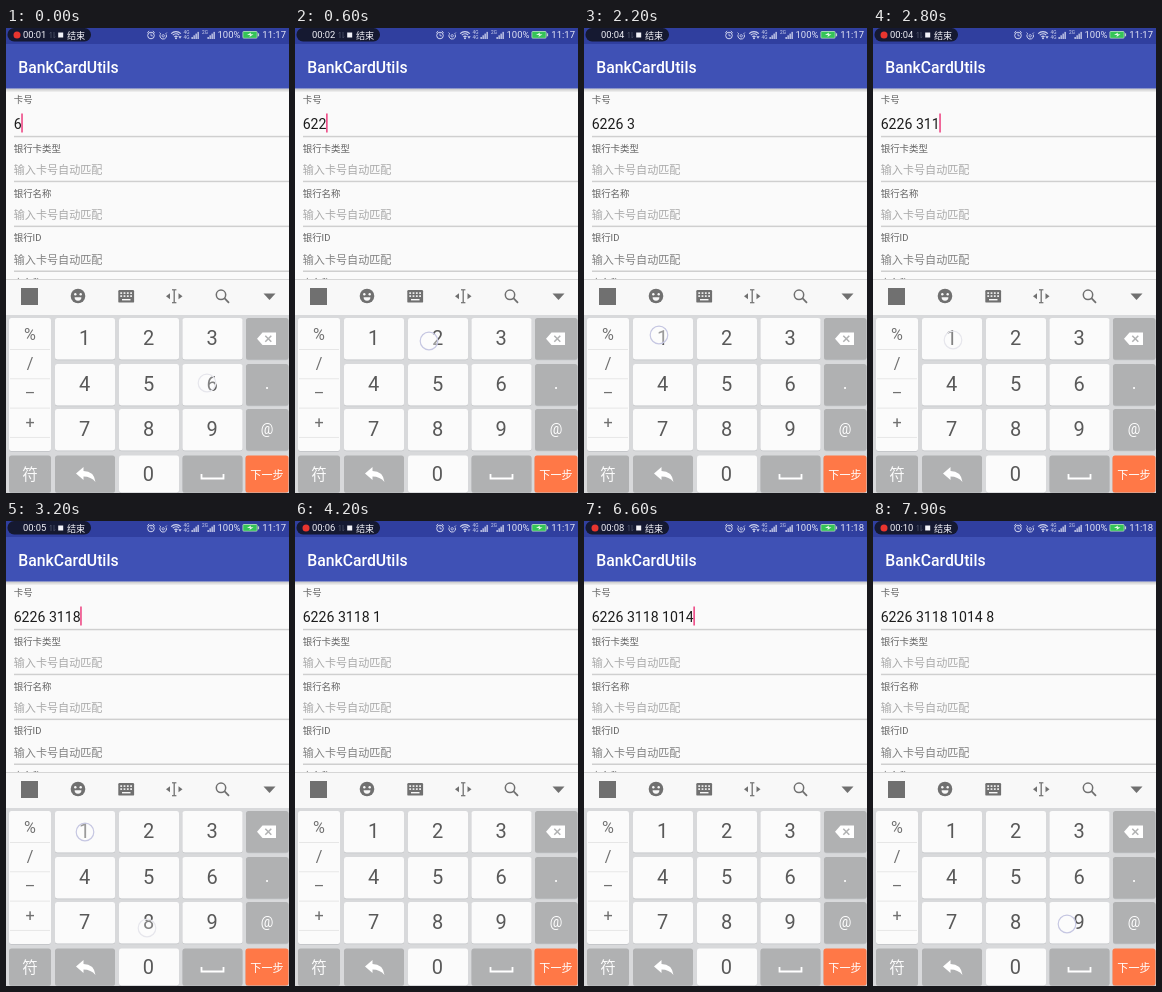
Animation of 283 by 465 pixels, one loop 8000 ms. Source, as an HTML page with a canvas:

```html
<!DOCTYPE html>
<html lang="zh-CN">
<head>
<meta charset="utf-8">
<title>BankCardUtils</title>
<style>
html, body { margin: 0; width: 100%; height: 100%; overflow: hidden; background: #fafafa; }
canvas { display: block; width: 283px; height: 465px; }
</style>
</head>
<body>
<canvas id="stage"></canvas>
<script>
const W = 283, H = 465, LOOP = 8000;
const canvas = document.getElementById('stage');
const ctx = canvas.getContext('2d');
const ratio = window.devicePixelRatio || 1;
canvas.width = W * ratio;
canvas.height = H * ratio;
const FONT = 'Roboto, "Noto Sans CJK SC", "Noto Sans CJK", sans-serif';

// Each tap: start time, position, character entered shortly after.
const taps = [
  [-200, 201, 355, '6'], [200, 138, 311, '2'], [500, 134, 313, '2'],
  [800, 204, 361, '6'], [1000, 204, 313, '3'], [2200, 75, 307, '1'],
  [2600, 80, 312, '1'], [3000, 141, 407, '8'], [3200, 79, 311, '1'],
  [5500, 141, 447, '0'], [5800, 79, 311, '1'], [6200, 78, 357, '4'],
  [6800, 137, 407, '8'], [7900, 194, 403, '9']
];
const TYPE_DELAY = 100, RING_SOLID = 200, RING_END = 300;
const caretOff = [[1500, 1900], [2200, 2300], [3500, 3800], [4200, 4600],
  [5200, 5600], [6700, 6900], [7500, 8000]];
const seconds = [300, 1100, 2000, 3000, 3800, 4700, 5700, 6700, 7500];
const dotBack = [700, 1600, 2500, 3400, 4200, 5200, 6200, 7100, 7900];

function rect(x, y, w, h, color) {
  ctx.fillStyle = color;
  ctx.fillRect(x, y, w, h);
}

function round(x, y, w, h, r, color) {
  ctx.fillStyle = color;
  ctx.beginPath();
  ctx.roundRect(x, y, w, h, r);
  ctx.fill();
}

function disc(x, y, r, color) {
  ctx.fillStyle = color;
  ctx.beginPath();
  ctx.arc(x, y, r, 0, Math.PI * 2);
  ctx.fill();
}

function arc(x, y, r, color, width = 1, from = 0, to = Math.PI * 2) {
  ctx.strokeStyle = color;
  ctx.lineWidth = width;
  ctx.beginPath();
  ctx.arc(x, y, r, from, to);
  ctx.stroke();
}

function trace(points) {
  ctx.beginPath();
  for (let i = 0; i < points.length; i += 2) ctx.lineTo(points[i], points[i + 1]);
}

function poly(points, color) {
  trace(points);
  ctx.fillStyle = color;
  ctx.fill();
}

function line(points, color, width = 1) {
  trace(points);
  ctx.strokeStyle = color;
  ctx.lineWidth = width;
  ctx.stroke();
}

function text(str, x, y, size, color, align = 'left', weight = 400) {
  ctx.font = `${weight} ${size}px ${FONT}`;
  ctx.fillStyle = color;
  ctx.textAlign = align;
  ctx.fillText(str, x, y);
}

function fade(y, h, from, to) {
  const g = ctx.createLinearGradient(0, y, 0, y + h);
  g.addColorStop(0, from);
  g.addColorStop(1, to);
  rect(0, y, W, h, g);
}

function recorder(t) {
  const n = seconds.filter(s => s <= t).length;
  const dotOn = n === 0 || t >= dotBack[n - 1];
  round(1.5, 0, 83.5, 13.5, 6.5, '#151931');
  if (dotOn) disc(11, 7, 3.5, '#e8352f');
  text('00:' + String(n + 1).padStart(2, '0'), 17, 10.4, 9.4, '#f4f4fa');
  line([45, 10, 45, 4, 43.8, 5.5], '#4c5169', .8);
  line([48, 4, 48, 10, 49.2, 8.5], '#4c5169', .8);
  rect(52.2, 4.5, 5, 5, '#f2f2f8');
  text('结束', 61, 10.5, 9.1, '#f4f4fa');
}

function statusIcons(t) {
  const c = '#d0d4ee';
  arc(145, 7.5, 3.3, c);
  line([145, 5.5, 145, 7.8, 146.8, 7.8], c, .8);
  line([141.3, 4.8, 143.2, 3], c);
  line([146.8, 3, 148.7, 4.8], c);
  arc(157.2, 7.8, 3.3, c, 1, -.4, 3.6);
  arc(157.2, 7.8, 1.2, c, .8);
  line([153.5, 4.5, 155, 6], c, .8);
  line([160.9, 4.5, 159.4, 6], c, .8);
  for (const r of [2.3, 4.6, 6.9]) arc(170, 10.5, r, c, 1.1, -2.35, -.8);
  disc(170, 10.3, 1, c);
  poly([172.3, 8.3, 175.7, 8.3, 174, 10.8], t >= 4000 && t < 4600 ? '#8f98d0' : c);
  signal(177.5, 185.5, ['4G', '4G'], c);
  signal(196, 201.5, ['2G'], c);
  text('100%', 211.5, 10.3, 9.5, '#dfe2f4');
  round(236.5, 3, 15, 7.6, 1.5, '#b9dcc4');
  rect(237.3, 3.8, 13.4, 6, '#35c458');
  poly([241, 7, 245, 4.6, 244.6, 6.3, 247.5, 6.3, 243.5, 9, 244, 7], '#e6f6ea');
  rect(251.8, 5.3, 1.3, 3, '#b9dcc4');
  text(t < 4800 ? '11:17' : '11:18', 280, 10.4, 9.5, '#e6e8f7', 'right');
}

function signal(x, barX, labels, c) {
  labels.forEach((label, i) => text(label, x, 6 + i * 5, 4.8, c));
  for (let i = 0; i < 4; i++) rect(barX + i * 2, 9 - i * 1.7, 1.3, 2 + i * 1.7, c);
}

function form(t) {
  rect(0, 60, W, 192, '#fafafa');
  fade(60.5, 4, 'rgba(0,0,0,.22)', 'rgba(0,0,0,0)');
  const labels = ['卡号', '银行卡类型', '银行名称', '银行ID', '卡名称'];
  labels.forEach((label, i) => {
    const y = 75.3 + i * 44.75 + (i ? 3.8 : 0);
    text(label, 7.7, y, 9.45, '#626262');
    if (i > 0 && i < 4) text('输入卡号自动匹配', 7.7, y + 22.3, 11.1, i === 3 ? '#808080' : '#a9a9a9');
    rect(8, 107.8 + i * 44.9, 275, 1.5, '#cfcfcf');
  });

  let typed = '';
  for (const tap of taps) if (tap[0] + TYPE_DELAY <= t) typed += tap[3];
  typed = typed.replace(/(.{4})(?=.)/g, '$1 ');
  text(typed, 7.7, 101, 14.1, '#1c1c1c');
  const hidden = caretOff.some(([a, b]) => t >= a && t < b);
  if (!hidden) rect(7.3 + ctx.measureText(typed).width, 85.5, 1.6, 19, '#ee4a86');
}

function toolbar() {
  const c = '#707070', paper = '#f8f8f8';
  rect(0, 251.5, W, 35.5, paper);
  rect(0, 251, W, 1, '#d6d6d6');
  rect(15, 260, 17, 17, c);

  disc(72, 268, 7.3, c);
  disc(69.3, 266.2, 1.2, paper);
  disc(74.7, 266.2, 1.2, paper);
  ctx.fillStyle = paper;
  ctx.beginPath();
  ctx.arc(72, 269.3, 3.4, 0, Math.PI);
  ctx.fill();

  round(112.3, 262, 15.8, 12.6, 1.2, c);
  for (let row = 0; row < 2; row++)
    for (let i = 0; i < 4; i++) rect(114.3 + i * 3.3, 264.3 + row * 3, 1.8, 1.6, paper);
  rect(116, 271, 8.5, 1.4, paper);

  line([168.2, 262, 168.2, 274.5], c, 1.3);
  line([166, 261.8, 170.4, 261.8], c, 1.2);
  line([166, 274.7, 170.4, 274.7], c, 1.2);
  poly([160, 268.3, 164, 265.3, 164, 271.3], c);
  poly([176.5, 268.3, 172.5, 265.3, 172.5, 271.3], c);

  arc(215, 266.8, 4.7, c, 1.5);
  line([218.4, 270.2, 223, 274.8], c, 1.8);
  poly([257.5, 265.5, 269.5, 265.5, 263.5, 272], c);
}

function key(x, y, w, h, color) {
  round(x, y + .8, w, h, 2.5, '#c0c2c5');
  round(x, y, w, h, 2.5, color);
}

function keyboard() {
  const white = '#fbfbfb', grey = '#b0b1b2', ink = '#595959';
  const rows = [290, 336, 381, 427.5], cols = [49, 113, 176.5], lastH = 37;
  rect(0, 287, W, 178, '#d8d9db');

  key(3, 290, 42, 133, white);
  ['%', '/', '–', '+'].forEach((s, i) => {
    text(s, 24, 312 + i * 29.3, 16.2, '#707070', 'center');
    rect(4, 321 + i * 29.3, 40, 1, '#e6e6e6');
  });

  for (let i = 0; i < 9; i++) {
    const x = cols[i % 3], y = rows[Math.floor(i / 3)];
    key(x, y, 60, 41.5, white);
    text(String(i + 1), x + 29.7, y + 27.3, 20, ink, 'center');
  }
  key(113, rows[3], 60, lastH, white);
  text('0', 142.3, 452.8, 20, ink, 'center');

  for (const y of rows.slice(0, 3)) key(240, y, 42.5, 41.5, grey);
  poly([251, 310.8, 256.5, 304.5, 270, 304.5, 270, 317, 256.5, 317], '#fff');
  line([259.3, 307.8, 265.3, 313.8], grey, 1.5);
  line([265.3, 307.8, 259.3, 313.8], grey, 1.5);
  text('.', 261, 360.5, 18, '#fff', 'center');
  text('@', 261, 406, 14, '#fff', 'center');

  key(3, rows[3], 42, lastH, grey);
  text('符', 24, 452.3, 15.5, '#fafafa', 'center');
  key(49, rows[3], 60, lastH, grey);
  ctx.fillStyle = '#fff';
  ctx.beginPath();
  ctx.moveTo(70, 445.5);
  ctx.lineTo(77.5, 439);
  ctx.lineTo(77.5, 443);
  ctx.quadraticCurveTo(88, 443, 89.5, 454);
  ctx.quadraticCurveTo(85, 448.5, 77.5, 448.5);
  ctx.lineTo(77.5, 452);
  ctx.fill();
  key(176.5, rows[3], 60, lastH, grey);
  line([195.5, 446, 195.5, 450.5, 217.5, 450.5, 217.5, 446], '#fff', 1.8);
  key(239.5, rows[3], 43, lastH, '#ff7847');
  text('下一步', 261, 451.3, 11.1, '#fff', 'center');
}

function touches(t) {
  for (const [start, x, y] of taps) {
    const age = t - start;
    if (age < 0 || age >= RING_END) continue;
    const solid = age < RING_SOLID;
    disc(x, y, 9, solid ? 'rgba(255,255,255,.4)' : 'rgba(255,255,255,.25)');
    arc(x, y, 8.8, solid ? '#c6c7e2' : '#e6e6ec', 1.2);
  }
}

function draw(now) {
  const t = Math.floor((now % LOOP) / 100) * 100;
  ctx.setTransform(ratio, 0, 0, ratio, 0, 0);
  form(t);
  rect(0, 0, W, 16, '#303f9f');
  rect(0, 16, W, 44.5, '#3f51b5');
  text('BankCardUtils', 12.3, 44.6, 15.75, '#fff', 'left', 500);
  recorder(t);
  statusIcons(t);
  toolbar();
  keyboard();
  touches(t);
}

const begin = performance.now();
function tick() {
  draw(performance.now() - begin);
  requestAnimationFrame(tick);
}
tick();
</script>
</body>
</html>
```
